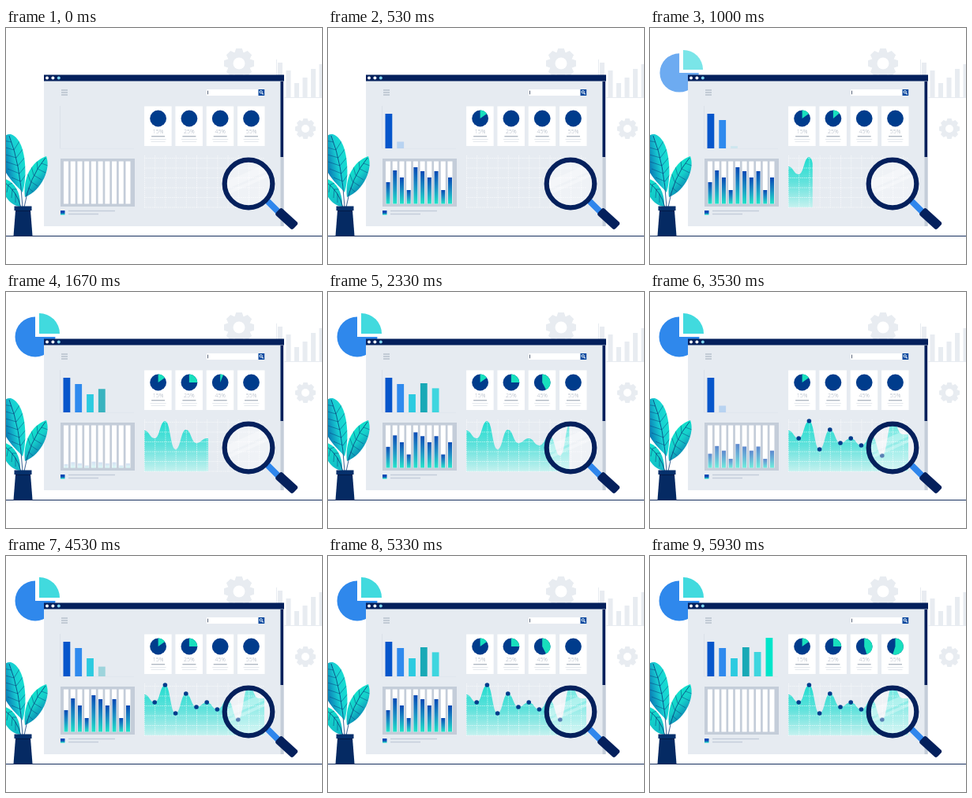
Recreate the animation shown at these times as an HTML page with a canvas. Size 400 by 300 pixels, loop 5990 ms.

```html
<!DOCTYPE html>
<html lang="en">
<head>
<meta charset="utf-8">
<title>Dashboard</title>
<style>
html, body { margin: 0; width: 100%; height: 100%; overflow: hidden; background: #fff; }
canvas { display: block; width: 400px; height: 300px; }
</style>
</head>
<body>
<canvas id="stage"></canvas>
<script>
const LOOP = 5990, TAU = Math.PI * 2;
const NAVY = '#04205c', BLUE = '#003c8c', PANEL = '#e6ebf1', GREY = '#c4cdd9', FAINT = '#e8ecf1';
const canvas = document.getElementById('stage');
const dpr = window.devicePixelRatio || 1;
canvas.width = 400 * dpr;
canvas.height = 300 * dpr;
const c = canvas.getContext('2d');
c.scale(dpr, dpr);

const ramp = (t, from, to) => Math.min(1, Math.max(0, (t - from) / (to - from)));
const easeOut = k => 1 - (1 - k) ** 3;

function rect(x, y, w, h, fill) {
  c.fillStyle = fill;
  c.fillRect(x, y, w, h);
}
function disc(x, y, r, fill) {
  c.fillStyle = fill;
  c.beginPath();
  c.arc(x, y, r, 0, TAU);
  c.fill();
}
function sector(x, y, r, from, to, fill) {
  c.fillStyle = fill;
  c.beginPath();
  c.moveTo(x, y);
  c.arc(x, y, r, (from - .25) * TAU, (to - .25) * TAU);
  c.fill();
}
function line(x1, y1, x2, y2, color, width = 1) {
  c.strokeStyle = color;
  c.lineWidth = width;
  c.beginPath();
  c.moveTo(x1, y1);
  c.lineTo(x2, y2);
  c.stroke();
}
function gradient(x1, y1, x2, y2, ...colors) {
  const g = c.createLinearGradient(x1, y1, x2, y2);
  colors.forEach((col, i) => g.addColorStop(i / (colors.length - 1), col));
  return g;
}
function scoped(draw) {
  c.save();
  draw();
  c.restore();
}

function gear(x, y, r, hole) {
  scoped(() => {
    c.translate(x, y);
    c.fillStyle = FAINT;
    for (let i = 0; i < 8; i++) {
      c.beginPath();
      c.moveTo(-r * .3, -r * .7);
      c.lineTo(-r * .2, -r);
      c.lineTo(r * .2, -r);
      c.lineTo(r * .3, -r * .7);
      c.fill();
      c.rotate(TAU / 8);
    }
    disc(0, 0, r * .78, FAINT);
    disc(0, 0, hole, '#fff');
  });
}

function backdrop() {
  rect(0, 0, 400, 300, '#fff');
  gear(295, 45, 19, 7.5);
  gear(379, 128, 13, 5);
  line(342.5, 40, 342.5, 88, FAINT);
  line(342, 88.5, 400, 88.5, FAINT);
  [44, 54, 70, 63, 52, 46].forEach((top, i) => rect(344 + i * 10.5, top, 6, 88 - top, FAINT));
}

function bigPie(t) {
  const k = ramp(t, 650, 1150);
  if (!k) return;
  scoped(() => {
    const s = .5 + .5 * easeOut(k) ** 2.5;
    c.globalAlpha = k;
    c.translate(40, 55);
    c.scale(s, s);
    sector(-3, 2, 25.5, .25, 1, '#2f88ec');
    sector(2, -2, 26, 0, .25, '#41dade');
  });
}

function windowFrame() {
  rect(48, 60, 304, 192, PANEL);
  rect(347.5, 67, 4, 185, GREY);
  rect(347.5, 68, 3.5, 96, NAVY);
  rect(48, 59.5, 304, 8, NAVY);
  ['#fff', '#fff', '#7fd4f0'].forEach((col, i) => disc(52 + i * 7.4, 63.5, 2, col));
  for (let y = 79; y < 87; y += 3) line(70, y, 78, y, '#b3bdcb', 1.4);
  rect(254, 78, 66, 8, '#fff');
  line(255.5, 79.7, 255.5, 84.3, '#33405c', .8);
  rect(319.5, 78, 7.7, 8, '#0a4aa0');
  c.strokeStyle = '#fff';
  c.lineWidth = 1;
  c.beginPath();
  c.arc(322.7, 81.3, 1.6, 0, TAU);
  c.stroke();
  line(324, 82.6, 325.6, 84.4, '#fff', 1.2);
}

function cards(t) {
  const spans = [[15, 0, 500], [25, 750, 1200], [45, 1560, 2380], [55, 2420, 2900]];
  spans.forEach(([value, from, to], i) => {
    const x = 192.6 + i * 39.3;
    rect(x - 17.5, 99.5, 34.5, 50.5, '#fff');
    disc(x, 115, 10.4, BLUE);
    const k = ramp(t, from, to);
    if (k) sector(x, 115, 10.4, 0, k * value / 100, '#18dfbd');
    c.fillStyle = '#a3adbb';
    c.font = '300 7px "Open Sans", "Noto Sans", sans-serif';
    c.textAlign = 'center';
    c.fillText(value + '%', x, 134.4);
    line(x - 8.5, 137.8, x + 8.5, 137.8, '#929dac', 1);
    line(x - 10, 141.5, x + 10, 141.5, '#dde2e9', .8);
    line(x - 9, 144.5, x + 9, 144.5, '#dde2e9', .8);
  });
}

function columns(t) {
  line(68.5, 99, 68.5, 153, '#d6dde6', .7);
  line(68.5, 153.3, 162, 153.3, '#dbe1e9', .6);
  const tops = [109, 117, 130, 116, 122, 104];
  const fills = ['#0656cb', '#2f8aee', '#2ccbe0', '#18a9b6', '#3ed6df', '#00e5ca'];
  tops.forEach((top, i) => {
    const k = easeOut(ramp(t, i * 490, i * 490 + 480));
    const h = (153 - top) * k;
    c.globalAlpha = Math.min(1, k * 1.05);
    rect(72.5 + i * 14.8, 153 - h, 8.8, h, fills[i]);
    c.globalAlpha = 1;
  });
}

function stripes(t) {
  rect(69, 166, 94, 61, GREY);
  const p = t % 2000;
  const k = easeOut(ramp(p, 0, 480)) * (1 - ramp(p, 1430, 1720));
  [196, 181, 190, 206, 177, 182, 190, 182, 206, 190].forEach((top, i) => {
    const x = 73 + i * 8.72, h = (223.5 - top) * k;
    rect(x, 169.5, 6, 54, '#fff');
    if (!h) return;
    c.globalAlpha = k;
    rect(x + .5, 223.5 - h, 5, h, gradient(0, 223.5 - h, 0, 223.5, '#0748b4', '#1b8fc4', '#20e4c9'));
    c.globalAlpha = 1;
  });
  rect(69, 232, 5.5, 5.5, gradient(0, 232, 0, 237.5, '#0748b4', '#0748b4', '#20e4c9'));
  line(79, 232.5, 138, 232.5, GREY, 1.5);
  line(79, 236.5, 117, 236.5, GREY, 1.5);
}

const peaks = [176, 186, 164, 200, 175, 192, 186, 195, 183, 208, 166, 181].map((y, i) => [175 + i * 13.2, y]);

function areaChart(t) {
  const edge = 152 * ramp(t, 590, 2620);
  if (edge) scoped(() => {
    c.beginPath();
    c.rect(175, 160, edge, 68);
    c.clip();
    c.beginPath();
    c.moveTo(175, 228);
    c.lineTo(...peaks[0]);
    peaks.slice(1).forEach(([x, y], i) => {
      const [px, py] = peaks[i], mid = (x + px) / 2;
      c.bezierCurveTo(mid, py, mid, y, x, y);
    });
    c.lineTo(327, 181);
    c.lineTo(327, 228);
    c.fillStyle = gradient(0, 164, 0, 228, '#20dccf', '#63e2dc', '#c4f1ef');
    c.fill();
  });
  scoped(() => {
    c.setLineDash([1.5, 1]);
    for (let x = 175.5; x < 328; x += 13.2) line(x, 162, x, 228, '#ffffffb0', .8);
    for (let y = 165.5; y < 229; y += 12.5) line(175, y, 327, y, '#ffffffb0', .8);
  });
  peaks.slice(1, 10).forEach(([x, y], i) => {
    const k = easeOut(ramp(t, 3020 + i * 35, 3200 + i * 35));
    if (k && i !== 7) disc(x, y, 2.8 * k, BLUE);
  });
}

function magnifier() {
  line(328, 217, 345, 234, '#2f86ec', 8);
  scoped(() => {
    c.translate(355.2, 242.5);
    c.rotate(.74);
    c.fillStyle = NAVY;
    c.beginPath();
    c.roundRect(-15, -6, 30, 12, 3);
    c.fill();
  });
  disc(307, 198, 30, '#ffffff59');
  scoped(() => {
    c.beginPath();
    c.arc(307, 198, 29, 0, TAU);
    c.clip();
    c.translate(307, 198);
    c.rotate(-.42);
    rect(-32, -14, 64, 9, '#ffffff50');
    rect(-32, -2, 64, 4, '#ffffff50');
  });
  c.strokeStyle = NAVY;
  c.lineWidth = 6.2;
  c.beginPath();
  c.arc(307, 198, 30.3, 0, TAU);
  c.stroke();
}

function leaf(outline, fill, spine, veins) {
  const shape = new Path2D(outline);
  c.fillStyle = fill;
  c.fill(shape);
  c.strokeStyle = '#0a3a78';
  c.lineWidth = .8;
  c.stroke(new Path2D(spine));
  scoped(() => {
    c.clip(shape);
    c.lineWidth = .5;
    c.stroke(new Path2D(veins));
  });
}

function plant() {
  leaf('M18 227C19 207 9 194 -4 191C-8 206 2 225 18 227Z',
    gradient(0, 192, 16, 226, '#12e2cd', '#14b9c6'),
    'M-2 196Q14 208 19 228',
    'M3 199L1 209M8 205L7 216M12 211L12 222M3 199L9 197M8 205L14 205');
  leaf('M21 209C27 190 27 142 6 135C-7 134 -11 152 -5 172C0 190 13 199 21 209Z',
    gradient(-3, 165, 25, 160, '#0879b4', '#18cfd3', '#17e0d0'),
    'M4 137Q18 172 21 228',
    'M7 145L-4 143M10 155L-4 151M13 165L-4 160M15 175L-3 169M17 185L2 179M19 195L7 190' +
    'M10 155L17 144M13 165L22 153M15 175L25 163M17 185L26 174M19 195L26 185');
  leaf('M24 215C21 192 31 170 51 163C57 178 46 206 24 215Z',
    gradient(26, 180, 46, 200, '#0fe3cc', '#16d0cb', '#0c8bb4'),
    'M50 165Q29 190 23 228',
    'M45 172L53 175M40 179L50 184M35 187L45 193M31 195L40 201M28 203L34 208' +
    'M40 179L39 168M35 187L32 176M31 195L27 184');
  rect(10.5, 226.5, 22, 5.5, '#05306c');
  c.fillStyle = '#052a63';
  c.beginPath();
  c.moveTo(12, 232);
  c.lineTo(31, 232);
  c.lineTo(33.5, 264);
  c.lineTo(9.5, 264);
  c.fill();
  line(12, 232.5, 31, 232.5, '#031a45', 1);
}

function draw(now) {
  const t = now % LOOP, cycle = t % 3000;
  backdrop();
  bigPie(t);
  windowFrame();
  cards(cycle);
  columns(cycle);
  stripes(t);
  areaChart(t);
  magnifier();
  line(0, 264.5, 400, 264.5, '#17305f', 1);
  plant();
}

function tick() {
  draw(performance.now());
  requestAnimationFrame(tick);
}
tick();
</script>
</body>
</html>
```
